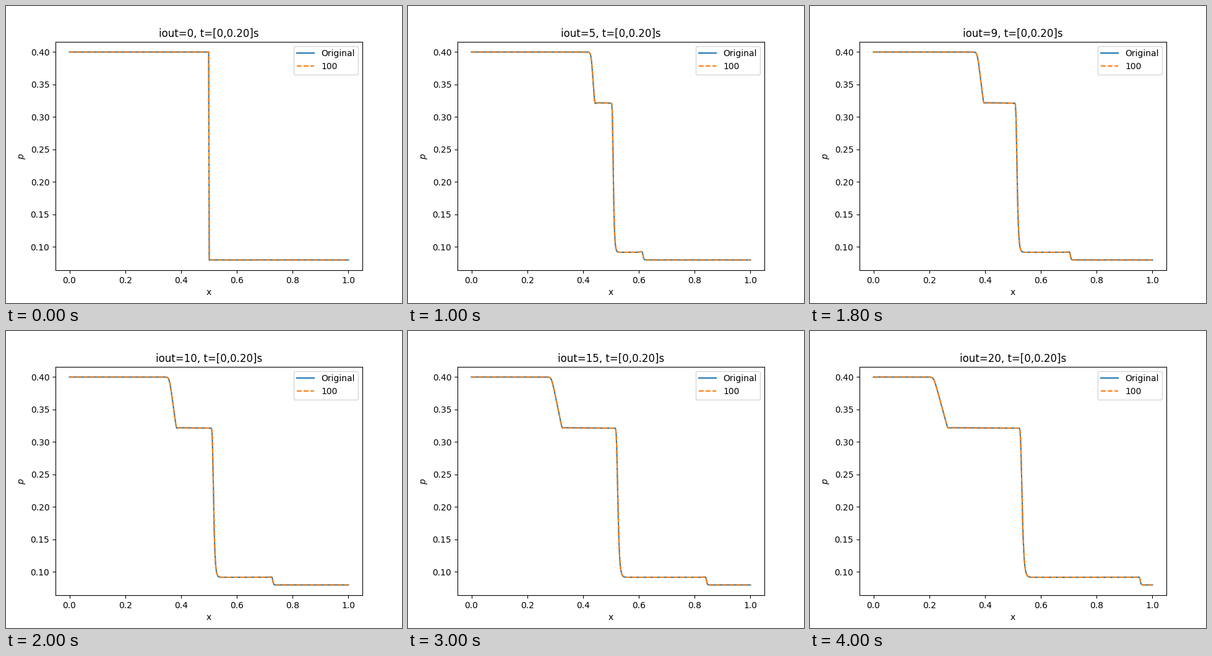
A matplotlib script for the animation above (4.2 s loop, 640 px wide and 480 px high).

```python
import numpy as np
import matplotlib.pyplot as plt
from matplotlib.animation import FuncAnimation

FRAMES = 21
DT = 0.01
LEFT, STAR_LEFT, STAR_RIGHT, RIGHT = 0.4, 0.3213, 0.0918, 0.08
HEAD_SPEED, TAIL_SPEED = -1.42, -1.17
CONTACT_SPEED, SHOCK_SPEED = 0.163, 2.275

x = np.linspace(0, 1, 500)


def softplus(s, r):
    return r * np.logaddexp(0, s / r)


def drop(s, w):
    """Step from 1 to 0 with a sharp shoulder and a soft foot, centred on s=0."""
    z = np.clip(s / w - np.log(np.log(2)), -6, 60)
    return 1 - np.exp(-np.exp(-z))


def bump(center, width):
    return np.exp(-((x - center) / width) ** 2)


def profile(t):
    if t == 0:
        return np.where(x < 0.5, LEFT, RIGHT)
    head = 0.5 + HEAD_SPEED * t
    tail = 0.5 + TAIL_SPEED * t
    contact = 0.5005 + CONTACT_SPEED * t
    shock = 0.5016 + SHOCK_SPEED * t
    spread = np.cbrt(t / 0.2)

    ramp = softplus(x - head, 0.0035 * spread) - softplus(x - tail, 0.0011 * spread)
    left = LEFT - (LEFT - STAR_LEFT) * ramp / (tail - head)
    plateau = np.clip((contact - x) / (contact - tail), 0, 1)
    left += np.where(x > tail + 0.004, 0.0007 * plateau, 0)
    left -= min(4e-5 / t, 0.002) * bump(tail + 0.005, 0.0025)

    crest = min(5e-5 / t, 0.002) * bump(shock - 0.008, 0.007)
    right = RIGHT + (STAR_RIGHT - RIGHT + crest) * drop(x - shock, 0.0018)
    return right + (left - right) * drop(x - contact, 0.0044 * spread)


fig, ax = plt.subplots(figsize=(6.4, 4.8), dpi=100)
solid, = ax.plot(x, profile(0), label="Original")
dashed, = ax.plot(x, profile(0), "--", label="100")
ax.set_xlim(-0.05, 1.05)
ax.set_ylim(0.064, 0.416)
ax.set_xlabel("x")
ax.set_ylabel("$p$")
ax.legend(loc="upper right")
title = ax.set_title("")


def update(i):
    y = profile(i * DT)
    solid.set_ydata(y)
    dashed.set_ydata(y)
    title.set_text(f"iout={i}, t=[0,0.20]s")
    return solid, dashed, title


anim = FuncAnimation(fig, update, frames=FRAMES, interval=200, repeat=True, repeat_delay=0)
plt.show()
```
